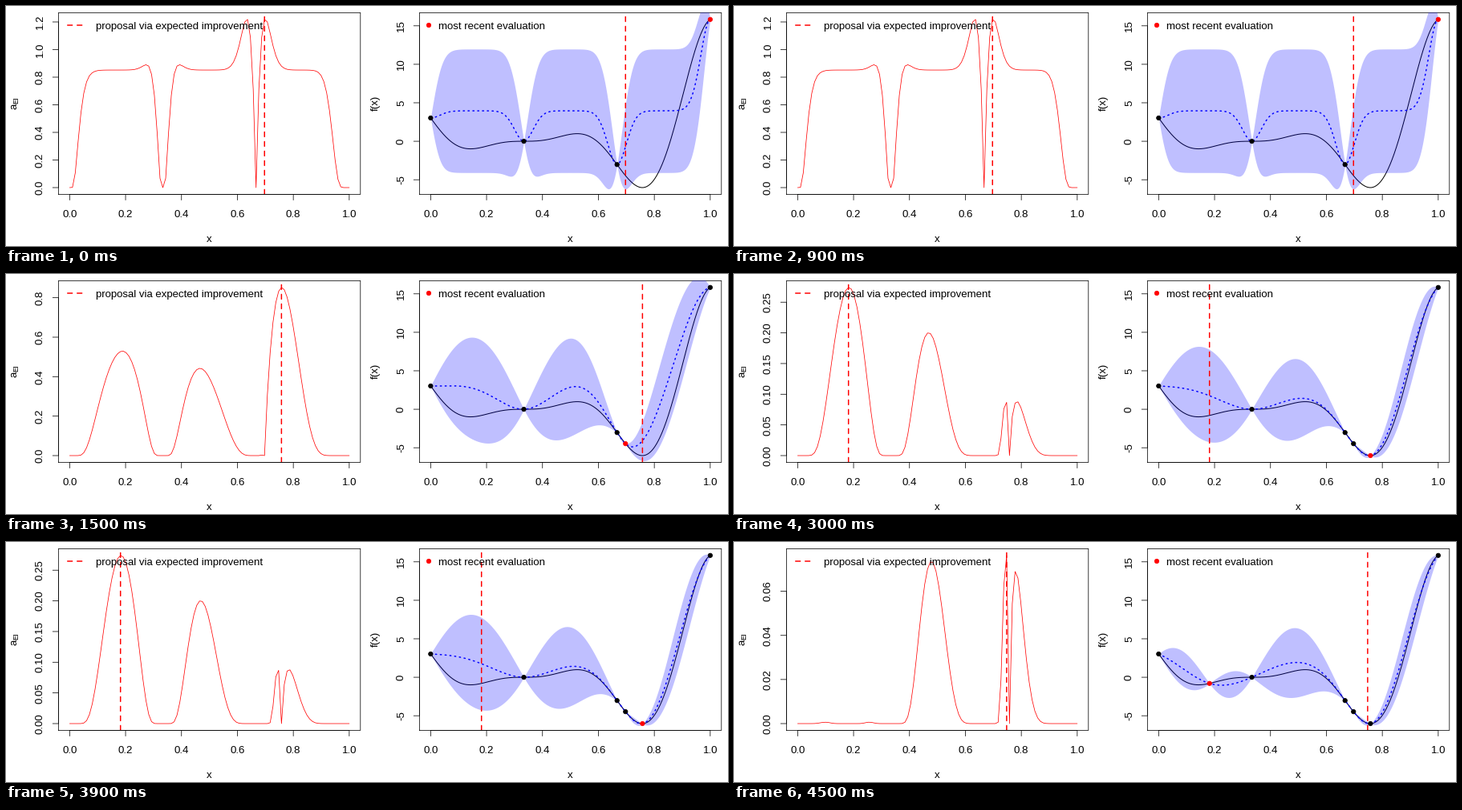
Animation, 900 px wide and 300 px high, one loop 6000 ms. Source, as a matplotlib script:

```python
import math

import matplotlib.pyplot as plt
import numpy as np
from matplotlib.animation import FuncAnimation
from matplotlib.patches import Circle, Rectangle

W, H, DPI = 900, 300, 100
PT = 72 / DPI                       # points per pixel
LEFT, TOP, RIGHT, BOTTOM = 65.4, 8.4, 441.8, 235.4
PAD = 0.04 / 1.08                   # axes extend 4% beyond the data
X0, X1 = LEFT + PAD * (RIGHT - LEFT), RIGHT - PAD * (RIGHT - LEFT)
Y0, Y1 = BOTTOM - PAD * (BOTTOM - TOP), TOP + PAD * (BOTTOM - TOP)
THIN, MEDIUM, THICK = 0.75, 1.0, 1.5
FONT_PX = 13.2
DASHED, DOTTED = (0, (4, 4)), (0, (1, 3))

GRID = np.linspace(0, 1, 100)
FINE = np.linspace(0, 1, 991)
START = [0, 33, 66, 99]             # indices into GRID
PROPOSALS = [69, 75, 18, 74]
TICKS = [(0.2, 7, 1), (0.2, 5, 1), (0.05, 6, 2), (0.02, 4, 2)]
POWER = 1.95                        # exponent of the correlation function
FIRST_BETA = 2.57                   # likelihood is flat for the start design


def objective(x):
    return (6 * x - 2) ** 2 * np.sin(12 * x - 4)


def kernel(a, b, beta):
    return np.exp(-10 ** beta * np.abs(np.subtract.outer(a, b)) ** POWER)


class Kriging:
    """Ordinary kriging with a power exponential kernel."""

    def __init__(self, x, y, beta):
        self.x, self.beta = x, beta
        corr = kernel(x, x, beta)
        self.inv = np.linalg.inv(corr)
        self.weight = self.inv.sum()
        self.trend = (self.inv @ y).sum() / self.weight
        resid = y - self.trend
        self.coef = self.inv @ resid
        self.var = resid @ self.coef / len(x)
        self.loss = len(x) * math.log(self.var) + np.linalg.slogdet(corr)[1]

    def predict(self, x):
        k = kernel(x, self.x, self.beta)
        ki = k @ self.inv
        spread = 1 - (ki * k).sum(1) + (1 - ki.sum(1)) ** 2 / self.weight
        return self.trend + k @ self.coef, np.sqrt(self.var * np.maximum(spread, 1e-12))


def fit(x, y):
    if len(x) == len(START):
        return Kriging(x, y, FIRST_BETA)
    models = (Kriging(x, y, b) for b in np.arange(0.8, 2.6, 0.002))
    return min(models, key=lambda m: m.loss)


def expected_improvement(mean, sd, best):
    z = (best - mean) / sd
    cdf = np.array([0.5 * math.erfc(-v / math.sqrt(2)) for v in z])
    pdf = np.exp(-z ** 2 / 2) / math.sqrt(2 * math.pi)
    return np.maximum(sd * (z * cdf + pdf), 0)


def build_step(i):
    x = GRID[START + PROPOSALS[:i]]
    y = objective(x)
    model = fit(x, y)
    return x, y, expected_improvement(*model.predict(GRID), y.min()), *model.predict(FINE)


STEPS = [build_step(i) for i in range(len(PROPOSALS))]
CURVE = objective(FINE)

fig = plt.figure(figsize=(W / DPI, H / DPI), dpi=DPI, facecolor="white")
ax = fig.add_axes([0, 0, 1, 1])


class Panel:
    def __init__(self, dx, low, high):
        self.dx, self.low, self.high = dx, low, high
        self.clip = Rectangle((LEFT + dx, TOP), RIGHT - LEFT, BOTTOM - TOP,
                              transform=ax.transData)

    def px(self, x):
        return self.dx + X0 + (X1 - X0) * np.asarray(x)

    def py(self, y):
        return Y0 + (Y1 - Y0) * (np.asarray(y) - self.low) / (self.high - self.low)

    def stroke(self, x, y, color="black", width=THIN, style="-", clip=False, z=2):
        line, = ax.plot(x, y, color=color, lw=width * PT, ls=style, zorder=z, snap=False,
                        solid_capstyle="round", dash_capstyle="round",
                        solid_joinstyle="round", dash_joinstyle="round")
        if clip:
            line.set_clip_path(self.clip)

    def curve(self, x, y, **kw):
        self.stroke(self.px(x), self.py(y), clip=True, **kw)

    def text(self, x, y, label, ha="center", rotation=0, size=FONT_PX):
        ax.text(self.dx + x, y, label, ha=ha, va="baseline", rotation=rotation,
                rotation_mode="anchor", fontsize=size * PT, family="Liberation Sans", zorder=8)

    def dot(self, x, y, color):
        ax.add_patch(Circle((x, y), 2.7, facecolor=color, edgecolor=color,
                            lw=THIN * PT, zorder=5))

    def proposal(self, x):
        x = float(self.px(x))
        self.stroke([x, x], [BOTTOM, TOP], "red", THICK, DASHED, clip=True, z=6)

    def frame(self, ticks, digits):
        l, r = LEFT + self.dx, RIGHT + self.dx
        self.stroke([l, r, r, l, l], [BOTTOM, BOTTOM, TOP, TOP, BOTTOM], z=1)
        xs = np.linspace(0, 1, 6)
        px, py = self.px(xs), self.py(ticks)
        self.stroke(px[[0, -1]], [BOTTOM] * 2)
        self.stroke([l, l], py[[0, -1]])
        for v, p in zip(xs, px):
            self.stroke([p, p], [BOTTOM, BOTTOM + 7.2])
            self.text(p - self.dx, 264.3, f"{v:.1f}")
        for v, p in zip(ticks, py):
            self.stroke([l, l - 7.2], [p, p])
            self.text(46, p, f"{v:.{digits}f}", rotation=90)
        self.text((LEFT + RIGHT) / 2 - 0.4, 295.3, "x")


def draw_acquisition(i, ei):
    panel = Panel(0, 0, ei.max())
    step, count, digits = TICKS[i]
    panel.frame(step * np.arange(count), digits)
    panel.text(13.5, 129.2, "a", "left", 90)
    panel.text(15.5, 121.8, "EI", "left", 90, FONT_PX * 0.7)
    panel.curve(GRID, ei, color="red")
    panel.proposal(GRID[PROPOSALS[i]])
    panel.stroke([76.7, 100.4], [24, 24], "red", THICK, DASHED, z=7)
    panel.text(112.4, 28.7, "proposal via expected improvement", "left")


def draw_model(i, x, y, mean, sd):
    panel = Panel(450, CURVE.min(), CURVE.max())
    panel.frame(np.arange(-5, 16, 5), 0)
    panel.text(14.2, 121.2, "f(x)", rotation=90)
    panel.curve(FINE, CURVE, width=MEDIUM)
    band = ax.fill_between(panel.px(FINE), panel.py(mean - sd), panel.py(mean + sd),
                           color="blue", alpha=0.25, lw=0, zorder=3)
    band.set_clip_path(panel.clip)
    panel.curve(FINE, mean, color="blue", width=THICK, style=DOTTED, z=4)
    for j, (px, py) in enumerate(zip(panel.px(x), panel.py(y))):
        panel.dot(px, py, "red" if j == len(x) - 1 else "black")
    panel.proposal(GRID[PROPOSALS[i]])
    panel.dot(527, 24, "red")
    panel.text(88.7, 28.7, "most recent evaluation", "left")


def draw(i):
    ax.clear()
    ax.set_xlim(0, W)
    ax.set_ylim(H, 0)
    ax.set_autoscale_on(False)
    ax.axis("off")
    x, y, ei, mean, sd = STEPS[i]
    draw_acquisition(i, ei)
    draw_model(i, x, y, mean, sd)
    return []


anim = FuncAnimation(fig, draw, frames=len(STEPS), interval=1500, repeat=True,
                     repeat_delay=0, init_func=lambda: [])
plt.show()
```
